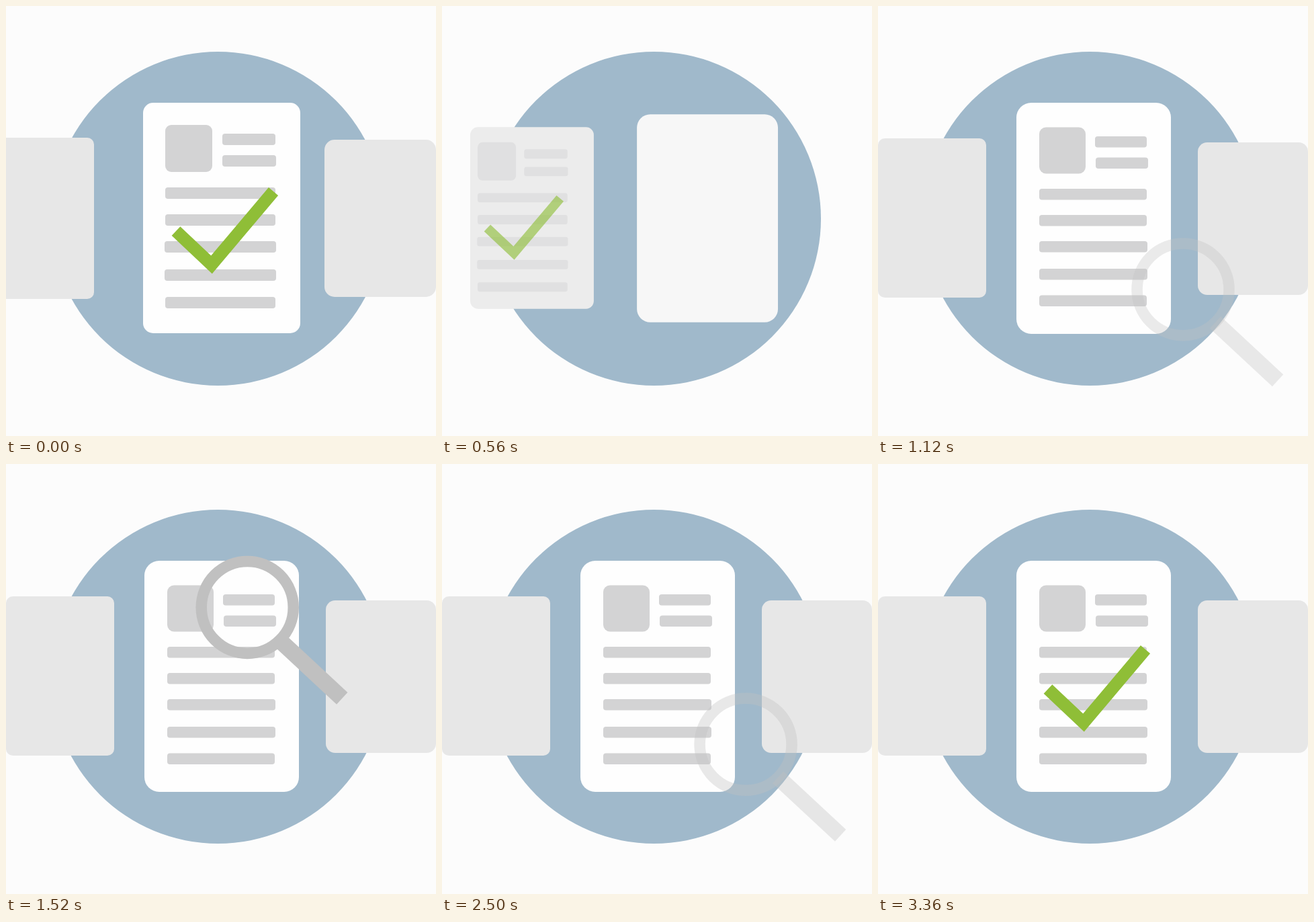
An HTML page with a canvas that plays this animation: 640 by 640 pixels, repeating every 3.4 s.

```html
<!DOCTYPE html>
<html lang="en">
<head>
<meta charset="utf-8">
<title>Document review</title>
<style>
  html, body { margin: 0; width: 100%; height: 100%; overflow: hidden; background: #fcfcfc; }
  canvas { display: block; }
</style>
</head>
<body>
<canvas width="640" height="640"></canvas>
<script>
const ctx = document.querySelector('canvas').getContext('2d');
const LOOP = 3400, SLIDE = 560;
const WHITE = [254, 254, 254], PALE = [231, 231, 231], INK = [211, 211, 212],
      GREEN = [143, 190, 55], BLUE = [160, 185, 203], GLASS = [192, 192, 192];

// Text bars as [left, top, right]
const oldBars = [[322, 190, 401], [322, 222, 402], [237, 270, 401], [237, 310, 401],
                 [236, 350, 402], [236, 392, 402], [237, 433, 401]];
const newBars = [[323, 194, 400], [324, 225.5, 402], [240, 272, 400], [240, 311, 400],
                 [240, 350, 401], [240, 391, 401], [240, 430.5, 400]];

const linear = (t, from, to) => Math.min(1, Math.max(0, (t - from) / (to - from)));
const ease = (t, from, to) => (1 - Math.cos(Math.PI * linear(t, from, to))) / 2;
const slide = (t, start) => ease(t, start, start + SLIDE);
const lerp = (a, b, p) => a + (b - a) * p;
const mix = (a, b, p) => a.map((v, i) => lerp(v, b[i], p));
const rgb = c => `rgb(${c.map(Math.round)})`;

function box(x, y, w, h, r, color) {
  if (w <= 0 || h <= 0) return;
  ctx.fillStyle = rgb(color);
  ctx.beginPath();
  ctx.roundRect(x, y, w, h, Math.min(r, w / 2, h / 2));
  ctx.fill();
}

// Card given by centre and size
function card(cx, cy, w, h, r, color) {
  box(cx - w / 2, cy - h / 2, w, h, r, color);
}

// Draws in a scaled and moved copy of the stage: point (ox, oy) lands on (x, y)
function placed(x, y, ox, oy, scale, alpha, draw) {
  if (alpha <= 0) return;
  ctx.save();
  ctx.globalAlpha = alpha;
  ctx.translate(x, y);
  ctx.scale(scale, scale);
  ctx.translate(-ox, -oy);
  draw();
  ctx.restore();
}

function checkMark(part) {
  const [ax, ay, bx, by, cx, cy] = [253, 335, 306, 385, 398, 276];
  const first = Math.hypot(bx - ax, by - ay), second = Math.hypot(cx - bx, cy - by);
  const length = part * (first + second);
  if (length <= 0) return;
  const p = Math.min(1, length / first), q = Math.max(0, (length - first) / second);
  ctx.strokeStyle = rgb(GREEN);
  ctx.lineWidth = 18.5;
  ctx.beginPath();
  ctx.moveTo(ax, ay);
  ctx.lineTo(lerp(ax, bx, p), lerp(ay, by, p));
  if (q > 0) ctx.lineTo(lerp(bx, cx, q), lerp(by, cy, q));
  ctx.stroke();
}

function leavingPage(t) {
  const move = slide(t, 176), size = slide(t, 213);
  card(lerp(321, 80.5, move), 315.5, lerp(234, 161, size), lerp(343, 237, size),
       lerp(15, 10, size), mix(WHITE, PALE, move));
  placed(lerp(319, 63, move), 316, 319, 316, lerp(1, .73, size), 1 - linear(t, 420, 700), () => {
    box(237, 177, 70, 70, 9, INK);
    for (const [l, y, r] of oldBars) box(l, y, r - l, 17, 4, INK);
  });
  placed(lerp(325.5, 71.5, slide(t, 165)), lerp(334, 328.5, move), 325.5, 334,
         lerp(1, .675, move), 1 - linear(t, 340, 920), () => checkMark(1));
}

function arrivingPage(t) {
  const p = slide(t, 213);
  card(lerp(557, 321, p), 316, lerp(166, 230, p), lerp(234, 344, p), lerp(15, 22, p),
       mix(PALE, WHITE, p));
  const pop = t < 820 ? 1.16 * ease(t, 640, 820) : lerp(1.16, 1, ease(t, 820, 940));
  placed(274.5, 215, 274.5, 215, pop, linear(t, 640, 760), () => box(240, 180.5, 69, 69, 10, INK));
  newBars.forEach(([l, y, r], i) => {
    const grow = linear(t, 640 + 30 * i, 820 + 30 * i);
    ctx.globalAlpha = Math.min(1, grow * 1.5);
    box(l, y, (r - l) * grow, 16.5, 4, INK);
  });
  ctx.globalAlpha = 1;
}

// Comes in from the lower right, circles once over the page and leaves the same way
function magnifier(t) {
  const away = 1 - ease(t, 1060, 1390) + ease(t, 2210, 2580);
  const angle = -2 * Math.PI * linear(t, 1390, 2210);
  const x = lerp(327 + 60 * Math.cos(angle), 460, away);
  const y = lerp(264 + 60 * Math.sin(angle), 436, away);
  const alpha = linear(t, 1060, 1240) * (1 - linear(t, 2360, 2580));
  placed(x, y, 0, 0, 1, alpha, () => {
    ctx.strokeStyle = rgb(GLASS);
    ctx.lineWidth = 16.5;
    ctx.beginPath();
    ctx.arc(0, 0, 68.5, 0, 2 * Math.PI);
    ctx.stroke();
    ctx.lineWidth = 24;
    ctx.beginPath();
    ctx.moveTo(48, 49);
    ctx.lineTo(141, 135.5);
    ctx.stroke();
  });
}

function draw(t) {
  ctx.fillStyle = '#fcfcfc';
  ctx.fillRect(0, 0, 640, 640);
  ctx.fillStyle = rgb(BLUE);
  ctx.beginPath();
  ctx.arc(315.5, 316.5, 248.5, 0, 2 * Math.PI);
  ctx.fill();

  card(lerp(50.5, -190, slide(t, 125)), 316, 161, 240, 10, PALE);
  leavingPage(t);
  arrivingPage(t);
  card(lerp(794, 558, slide(t, 446)), 316.5, 164, 227, 14, PALE);
  magnifier(t);
  checkMark(ease(t, 2640, 3150));
}

function tick() {
  draw(performance.now() % LOOP);
  requestAnimationFrame(tick);
}
tick();
</script>
</body>
</html>
```
